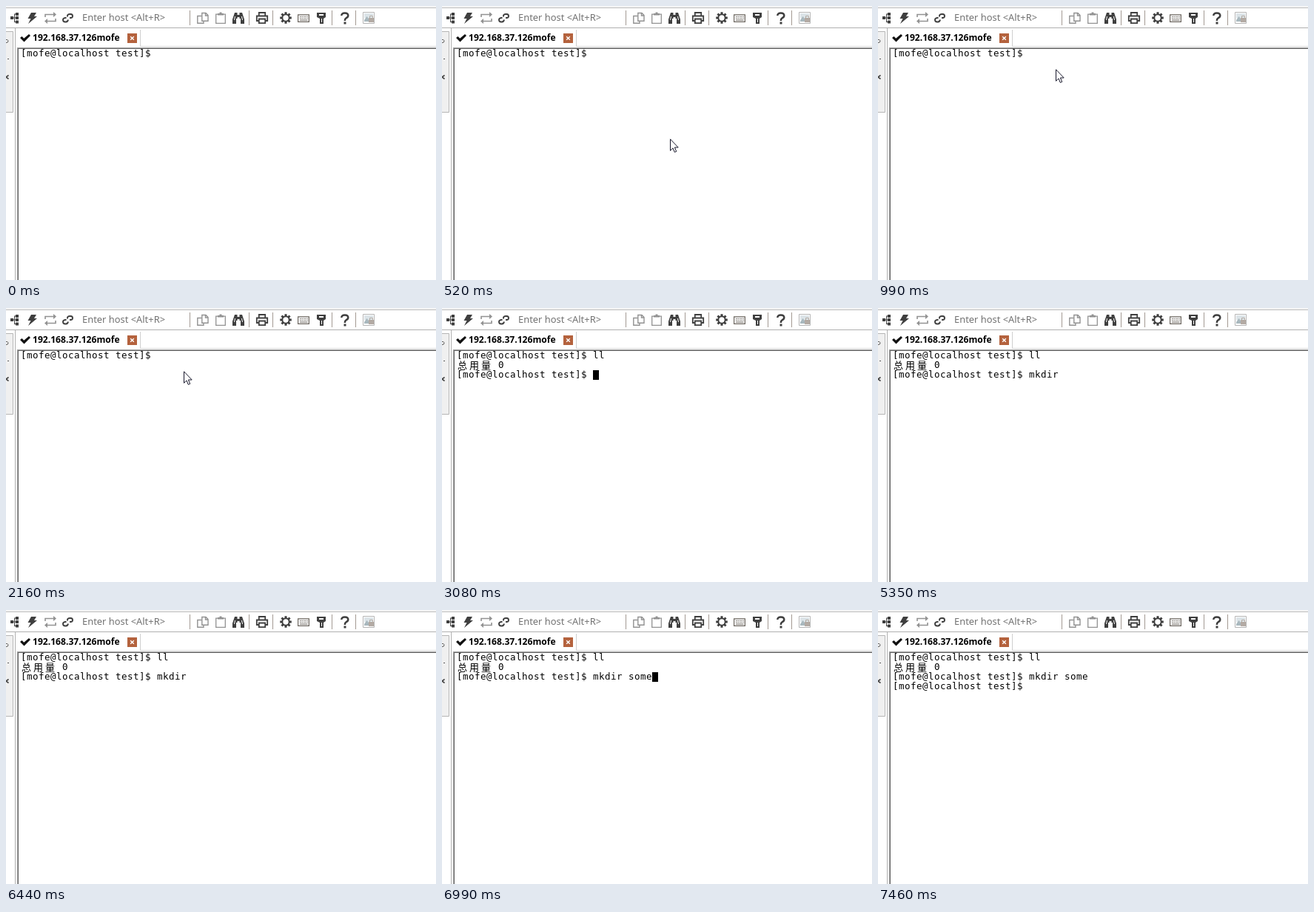
These frames come from a looping animation (581x370 px, 8 s). An HTML page with a canvas:

```html
<!DOCTYPE html>
<html lang="en">
<head>
<meta charset="utf-8">
<title>Terminal session</title>
<style>
html, body { margin: 0; width: 100%; height: 100%; overflow: hidden; background: #fff; }
canvas { display: block; }
</style>
</head>
<body>
<canvas id="stage" width="581" height="370"></canvas>
<script>
const ctx = document.getElementById('stage').getContext('2d');
const LOOP = 8000, CELL = 8, ROW = 13, LEFT = 20, TOP = 58;
const DARK = '#3f3f3f', GRAY = '#929292';
const PROMPT = '[mofe@localhost test]$ ';
const TYPED = 'll\nmkdir some\n';
const KEYS = [2540, 2700, 3080, 4500, 4570, 5030, 5200, 5350, 5580, 6590, 6670, 6820, 6990, 7140];
const CARET_ON = [[1690, 2160], [2540, 3250], [3780, 4330], [4500, 5350], [5580, 6440], [6590, 7460]];

function rect(x, y, w, h, color) {
  ctx.fillStyle = color;
  ctx.fillRect(x, y, w, h);
}

function fill(d, color) {
  ctx.fillStyle = color;
  ctx.fill(new Path2D(d), 'evenodd');
}

function line(d, color, width = 1) {
  ctx.strokeStyle = color;
  ctx.lineWidth = width;
  ctx.stroke(new Path2D(d));
}

function text(s, x, y, font, color) {
  ctx.font = font;
  ctx.fillStyle = color;
  ctx.fillText(s, x, y);
}

function drawGear(cx, cy) {
  for (let i = 0; i < 8; i++) {
    ctx.save();
    ctx.translate(cx, cy);
    ctx.rotate(i * Math.PI / 4);
    rect(-1.5, -7.8, 3, 3.5, DARK);
    ctx.restore();
  }
  ctx.beginPath();
  ctx.arc(cx, cy, 4.7, 0, 7);
  ctx.strokeStyle = DARK;
  ctx.lineWidth = 2;
  ctx.stroke();
}

function drawToolbar() {
  rect(0, 0, 581, 2, '#f4f4f4');
  rect(0, 2, 581, 1, '#bdbdbd');
  for (const x of [248, 328, 360, 440, 472]) rect(x, 6, 1, 20, '#a39a93');

  // session tree
  line('M9 16H15M11.5 11V21M11 11H14M11 21.5H14', DARK);
  fill('M6 14h4v4h-4zM13 9h4v4h-4zM13 14h4v4h-4zM13 19.5h4v4h-4z', DARK);
  // lightning
  fill('M34 9H41L38 14H42L30 24L33.5 17H29.5Z', DARK);
  // reconnect
  line('M53 15V11.5H65M67 17V20.5H55', GRAY, 1.6);
  fill('M64 8L68 11.5L64 15ZM56 17L52 20.5L56 24Z', GRAY);
  // chain
  line('M83 14.5V13Q83.5 11 86 11H87.5Q90 11.2 90 13.5Q90 16 87.5 16H86M81.5 16H80Q77 16.3 77 18.8Q77 21.5 80 21.5H81Q83.5 21.3 84 18.5', DARK, 1.9);
  text('Enter host <Alt+R>', 103, 20, '12.9px "Noto Sans", sans-serif', '#727272');
  // copy
  line('M264.8 9.5H270L273 12.5V20.2H264.8ZM269.5 9.5V13H273M264 13.5H258.8V23.2H267V21', GRAY, 1.4);
  // paste
  line('M287 11.2H283.7V23.3H296.3V11.2H293', GRAY, 1.3);
  fill('M286 10H288.5V8.5H291.5V10H294V12.5H286Z', GRAY);
  // binoculars
  fill('M309 9h3.5v3h3v-3h3.5l3 9v6h-5v-7h-1.5v-2h-3v2h-1.5v7h-5v-6z', DARK);
  line('M309.5 14L308.5 19M318.5 14L319.5 19', '#fff');
  // printer
  line('M341.8 13V9H350.2V13M341 20H338.8V13.5H353.2V20H351M341.8 17.5H350.2V23.2H341.8Z', DARK, 1.8);
  drawGear(378, 16);
  // keyboard
  line('M394.6 11.9H409.4V21.4H394.6Z', '#6b655e', 1.2);
  ctx.setLineDash([1.5, 1]);
  line('M397 14.5H408M397 16.7H408', '#6b655e');
  ctx.setLineDash([]);
  line('M397 19H407.5', '#6b655e');
  // key
  fill('M420 9H432V15L429 17V24H424V17L420 15ZM423 11V13H429V11Z', DARK);
  line('M426.5 17V22', '#fff');
  // help
  line('M453.3 13Q453.5 9.5 457.8 9.5Q462.3 9.5 462.3 13Q462.3 15 459.8 16.2Q457.8 17.3 457.8 20', DARK, 2.5);
  rect(456.5, 21.5, 3, 3, DARK);
  // picture
  line('M482.5 8.5H497.5V23.5H482.5Z', '#b5b5b5');
  rect(484, 10, 12, 6, '#dce4e8');
  fill('M484 19L487.5 14L490 17V21H484Z', '#a9b8be');
  rect(490, 16, 7, 6, '#b3aaa3');
  line('M491.5 16V13.5H495.5V16', '#b3aaa3');
}

function drawFrame() {
  rect(0, 29, 581, 1, '#b0b0b0');
  rect(0, 34, 10, 110, '#f0f0f0');
  line('M0 34.5H9.5V143.5H0', '#b5b5b5');
  line('M0 45.5H1.5Q3 46 3 47.5Q3 49.5 0 49.5', '#555');
  rect(2, 71, 2, 1, '#555');
  line('M0 96L3.5 93.5M0 96L3.5 98.5', '#444', 1.6);
  rect(12, 30, 1, 340, '#b0b0b0');

  // tab
  rect(181, 32, 1, 22, '#cfcfcf');
  rect(181, 54, 400, 1, '#dedede');
  fill('M19 43L21.5 41L24.2 43.8L31 38L33 40L24.5 48.5Z', '#111');
  text('192.168.37.126mofe', 36, 47, 'bold 12.1px "Noto Sans", sans-serif', '#000');
  rect(164, 37, 13, 13, '#b4623d');
  line('M168.2 41.2L172.8 45.8M172.8 41.2L168.2 45.8', '#fff', 1.4);

  rect(15, 56, 566, 1, '#a0a0a0');
  rect(15, 56, 1, 314, '#a0a0a0');
  rect(16, 57, 565, 1, '#696969');
  rect(16, 57, 1, 313, '#696969');
}

function drawRow(s, row) {
  let x = LEFT;
  const base = TOP + row * ROW;
  for (const ch of s) {
    const wide = ch > '\u2e80';
    if (wide) text(ch, x + 1, base + 11, '13px "Noto Sans CJK SC", "Noto Sans CJK", sans-serif', '#000');
    else text(ch, x, base + 10, '12.5px "DejaVu Sans Mono", monospace', '#000');
    x += wide ? 2 * CELL : CELL;
  }
  return x;
}

function drawTerminal(t) {
  const count = KEYS.filter(k => t >= k).length;
  const lines = TYPED.slice(0, count).split('\n').map(s => PROMPT + s);
  if (lines.length > 1) lines.splice(1, 0, '总用量 0');
  let x = 0;
  lines.forEach((s, row) => { x = drawRow(s, row); });
  if (CARET_ON.some(([a, b]) => t >= a && t < b))
    rect(x, TOP + (lines.length - 1) * ROW, CELL, ROW, '#000');
}

function drawPointer(t) {
  if (t < 140 || t >= 2540) return;
  const step = Math.min(10, Math.floor((t - 140) / 77));
  const left = (1 - step / 10) ** 2;
  const x = Math.round(240 + 188 * left);
  const y = t < 990 ? Math.round(88 + 254 * left) : 85;
  ctx.save();
  ctx.translate(x, y);
  if (t >= 1140 && t < 1230) {
    ctx.beginPath();
    ctx.arc(.5, .5, 11.5, 0, 7);
    ctx.strokeStyle = '#000';
    ctx.lineWidth = 1;
    ctx.stroke();
  }
  const arrow = 'M.5 .8V16.3L4 12.9L6.3 18.4L8.7 17.4L6.4 12H11.2Z';
  fill(arrow, '#fff');
  line(arrow, '#16162a');
  ctx.restore();
}

function draw(now) {
  const t = now % LOOP;
  rect(0, 0, 581, 370, '#fff');
  drawToolbar();
  drawFrame();
  drawTerminal(t);
  drawPointer(t);
}

let start;
function tick(now) {
  start ??= now;
  draw(now - start);
  requestAnimationFrame(tick);
}
requestAnimationFrame(tick);
</script>
</body>
</html>
```
